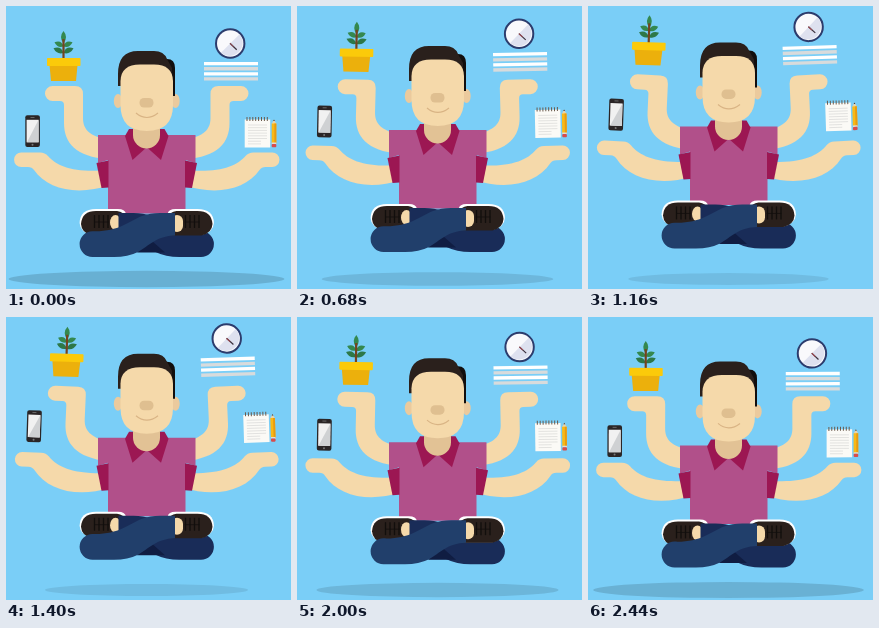
An HTML page with a canvas for the animation above (2.52 s loop, 285x283 px).

```html
<!DOCTYPE html>
<html lang="en">
<head>
<meta charset="utf-8">
<title>Multitasking meditation</title>
<style>
html, body { margin: 0; width: 100%; height: 100%; overflow: hidden; background: #7acef7; }
canvas { display: block; }
</style>
</head>
<body>
<canvas id="stage" width="285" height="283"></canvas>
<script>
const ctx = document.getElementById('stage').getContext('2d');
const LOOP = 2520, STEP = 40, LAST = 2440;
const MIRROR = 281.5;
const C = {
  sky: '#7acef7', skin: '#f5d9aa', ear: '#ebca9d', neck: '#e2c295', nose: '#dfbf90',
  hair: '#2a201c', black: '#120e0d', shirt: '#b1508a', cuff: '#9c1753',
  jeans: '#213f6b', back: '#192c58', crotch: '#101d42', white: '#ffffff', grey: '#d8dbdc'
};

function fill(path, color) {
  ctx.fillStyle = color;
  ctx.fill(new Path2D(path));
}
function line(path, color, width) {
  ctx.strokeStyle = color;
  ctx.lineWidth = width;
  ctx.stroke(new Path2D(path));
}
function rect(x, y, w, h, color, r = 0) {
  ctx.fillStyle = color;
  ctx.beginPath();
  ctx.roundRect(x, y, w, h, r);
  ctx.fill();
}
function oval(x, y, rx, ry, color) {
  ctx.fillStyle = color;
  ctx.beginPath();
  ctx.ellipse(x, y, rx, ry, 0, 0, Math.PI * 2);
  ctx.fill();
}
function group(draw) {
  ctx.save();
  draw();
  ctx.restore();
}
function mirrored(draw, axis = MIRROR) {
  group(() => {
    ctx.translate(axis, 0);
    ctx.scale(-1, 1);
    draw();
  });
}
function both(draw, axis) {
  group(draw);
  mirrored(draw, axis);
}
function turn(x, y, angle) {
  ctx.translate(x, y);
  ctx.rotate(angle);
  ctx.translate(-x, -y);
}

function arms(lift) {
  group(() => {
    turn(115, 150, 0.05 * lift);
    fill('M46.5 80H69Q77 80 77 88V112C77 124 84 130 102 134V153C70 151 58 137 58 117V99Q58 95 54 95H46.5A7.5 7.5 0 0 1 46.5 80Z', C.skin);
  });
  group(() => {
    turn(95, 172, 0.046 * lift);
    fill('M15.3 146.5H34Q39 146.5 42 150C52 161 68 167 104 164V179C72 190 42 184 28 164Q26 161 22 161H15.3A7.25 7.25 0 0 1 15.3 146.5Z', C.skin);
  });
}

function shoe() {
  fill('M73.6 217Q74 203 90 203H112Q119 203 120 208V229H86Q74 226 73.6 217Z', C.white);
  fill('M75 218Q76 205 90 205H111Q118 206 119 211V229.5H86Q75.5 227 75 218Z', C.hair);
  for (const x of [88.5, 93, 97.5, 102]) line(`M${x} 209V222`, C.black, 1.3);
  line('M88 216H103', C.black, 0.8);
}

function leg(color) {
  fill('M169 207V229.5C150 230 143 240 132 246Q122 251 108 251H86.5A12.9 12.9 0 0 1 86.5 225.2C112 226 122 216 136 210Q144 207 154 207Z', color);
}

function legs() {
  shoe();
  oval(109.5, 216.5, 5.5, 7.5, C.skin);
  rect(130, 228, 30, 18, C.back);
  mirrored(() => leg(C.back));
  fill('M131 246.5L146 235L159 246.5Z', C.crotch);
  mirrored(shoe);
  rect(165, 209, 12, 17, C.skin, 6);
  leg(C.jeans);
}

function torso() {
  fill('M92 129H189.5V157L179.5 154V207.5H102V154L92 157Z', C.shirt);
  both(() => {
    fill('M90.5 157L102.5 154.5V181.5L95.5 182Z', C.cuff);
    fill('M123 123H128L141 141L126.5 154L119 130Z', C.cuff);
  });
  fill('M127 115H154V129A13.3 13.3 0 0 1 127 129Z', C.neck);
}

function head() {
  both(() => oval(112, 95, 4.2, 7, C.ear));
  fill('M155 53H161Q169 53 169 62V90H160Z', C.black);
  fill('M112 90V68Q112 45 132 45H148Q158 45 161 53L166 62V80H112Z', C.hair);
  fill('M114.5 75Q115 58.5 134 58.5H148Q166.5 58.5 167 75V99Q167 125 140.7 125Q114.5 125 114.5 99Z', C.skin);
  rect(133.5, 92, 14, 9.5, C.nose, 4.5);
  line('M130 107Q140.7 116 152 107', '#d9b485', 1.2);
}

function plant() {
  fill('M57.5 25Q62.5 31 57.5 37.5Q52.5 31 57.5 25Z', '#34884f');
  both(() => {
    fill('M57.5 40.5Q51.5 42.5 48.5 36.3Q55.5 33.5 57.5 40.5Z', '#34884f');
    fill('M57.5 47Q51 49 47.5 42.3Q55 39.5 57.5 47Z', '#2d7848');
  }, 115);
  line('M57.5 33V53', '#75431f', 2.2);
  fill('M43.5 59H71.5L70 75H45Z', '#ecb00c');
  rect(41, 52, 33.5, 8, '#fbca0a', 0.8);
}

function phone() {
  rect(19.3, 109.3, 14.6, 31.8, '#2a2526', 2);
  rect(20.6, 113.8, 12, 22.5, '#f1f1f1');
  fill('M32.6 113.8V136.3H21Z', '#cfd1d3');
  line('M24.5 111.5H28.5', '#777777', 0.8);
  oval(26.5, 138.7, 1, 1, '#777777');
}

function clock() {
  oval(224.2, 37.5, 15.2, 15.2, '#2c3c6d');
  oval(224.2, 37.5, 13.2, 13.2, '#f9f9fc');
  fill('M233.5 28.2A13.2 13.2 0 0 1 214.9 46.8Z', '#dee1ef');
  line('M224 37.3L230.7 43.7', '#392f3b', 1.2);
  line('M224 37.3L227.5 40.7', '#a54a51', 1);
}

function papers() {
  for (let i = 0; i < 4; i++) rect(198, 56 + i * 5.1, 54, 3.3, i % 2 ? C.grey : C.white);
}

function notebook() {
  rect(238.7, 113.5, 25.5, 28, '#fbfaf6');
  for (let y = 119; y < 138; y += 2.7) line(`M242 ${y}H${y > 135 ? 255 : 261}`, '#dcdcda', 0.8);
  for (let x = 241; x < 263; x += 2.9) line(`M${x} 111V115`, '#6a5a4c', 1);
  fill('M265.7 118L268 113.5L270.3 118Z', '#eed3a5');
  fill('M267.2 115L268 113.5L268.8 115Z', '#332b2b');
  rect(265.7, 117.5, 4.6, 20, '#f9b916');
  rect(268.4, 117.5, 1.9, 20, '#e69a13');
  rect(265.7, 136.5, 4.6, 1.5, '#dddddd');
  rect(265.7, 138, 4.6, 3.2, '#d94c4c', 1);
}

function floating(draw, x, y, dx, dy, lift) {
  group(() => {
    ctx.translate(dx * lift, dy * lift);
    turn(x, y, Math.sign(dx) * 0.035 * lift);
    draw();
  });
}

function render(time) {
  const t = Math.min(Math.floor((time % LOOP) / STEP) * STEP, LAST);
  const lift = 1 - Math.abs(t - LOOP / 2) / (LOOP / 2);
  const spread = 138 - 41 * lift;

  rect(0, 0, 285, 283, C.sky);
  oval(140.5, 273, spread, spread * 0.059, `rgba(0,0,0,${0.145 - 0.065 * lift})`);

  group(() => {
    ctx.translate(0, -9.3 * lift);
    both(() => arms(lift));
    torso();
    legs();
    head();
  });

  floating(plant, 57.5, 60, 3.2, -17.2, lift);
  floating(phone, 26.5, 125, 1.7, -18, lift);
  floating(clock, 224.2, 37.5, -3.9, -18, lift);
  floating(papers, 225, 65.5, -3.4, -17.5, lift);
  floating(notebook, 252, 127, -1.2, -18, lift);
}

let start;
function tick(now) {
  start ??= now;
  render(now - start);
  requestAnimationFrame(tick);
}
render(0);
requestAnimationFrame(tick);
</script>
</body>
</html>
```
